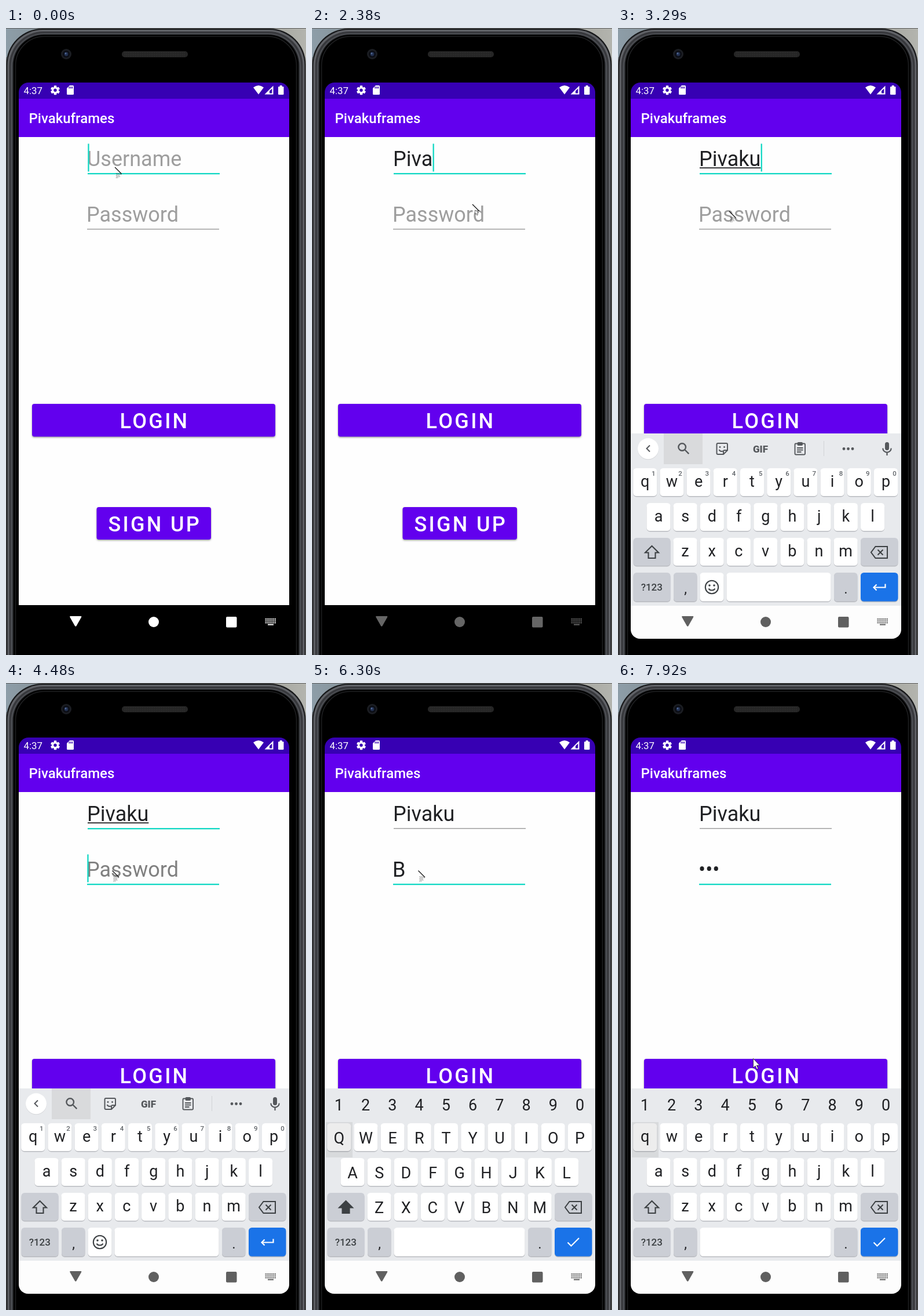
Recreate the animation shown at these times as an HTML page with a canvas. Size 518 by 1081 pixels, loop 8000 ms.

```html
<!DOCTYPE html>
<html lang="en">
<head>
<meta charset="utf-8">
<title>Login screen</title>
<style>
html, body { margin: 0; width: 100%; height: 100%; overflow: hidden; background: #000; }
canvas { display: block; width: 518px; height: 1081px; }
</style>
</head>
<body>
<canvas id="stage"></canvas>
<script>
const W = 518, H = 1081, LOOP = 8000;
const canvas = document.getElementById('stage');
const ctx = canvas.getContext('2d');
const dpr = window.devicePixelRatio || 1;
canvas.width = W * dpr;
canvas.height = H * dpr;

const PURPLE = '#6200ee', TEAL = '#12d8c4', INK = '#202124', KEY_INK = '#3c4043';
const USER = 'Pivaku', TITLE = 'Pivakuframes';

// Timelines: [start ms, value], each held until the next entry.
const tracks = {
  typed: [[0, 0], [730, 1], [880, 2], [1970, 3], [2120, 4], [3040, 6]],
  userCaret: [[0, 1], [120, 0], [610, 1], [1380, 0], [1700, 1], [2520, 0], [2760, 1], [4190, 0], [4620, 1], [4760, 0]],
  pass: [[0, ''], [6300, 'B'], [6450, '•B'], [6980, '••'], [7680, '•••']],
  passCaret: [[0, 0], [4480, 1], [5500, 0], [6450, 1], [6980, 0], [7680, 1], [7920, 0]],
  mouse: [[0, [188, 240, 1]], [730, [221, 239, 0]], [1330, [271, 300, 0]], [1450, [188, 325, 1]],
    [2380, [277, 304, 0]], [2640, [192, 316, 1]], [4190, [183.5, 323.5, 1]], [6980, [368, 323, 0]],
    [7130, [408, 507, 0]], [7280, [330, 562, 2]], [7400, [268, 614, 2]], [7530, [239, 641, 2]], [7680, [233, 647, 2]]],
  nav: [[0, '#ffffff'], [880, '#b4b4b4'], [1030, '#666666'], [2520, '#606060']],
  board: [[0, ''], [2520, 'text'], [4760, 'short'], [5500, 'pass']],
  caps: [[0, 0], [5650, 1], [7130, 0]]
};

function at(name, t) {
  let v;
  for (const [start, value] of tracks[name]) if (t >= start) v = value;
  return v;
}

function rect(x, y, w, h, color) {
  ctx.fillStyle = color;
  ctx.fillRect(x, y, w, h);
}

function round(x, y, w, h, r, color) {
  ctx.fillStyle = color;
  ctx.beginPath();
  ctx.roundRect(x, y, w, h, r);
  ctx.fill();
}

function disc(x, y, r, color) {
  ctx.fillStyle = color;
  ctx.beginPath();
  ctx.arc(x, y, r, 0, 7);
  ctx.fill();
}

function path(d, fill, stroke, width = 2) {
  const p = new Path2D(d);
  if (fill) { ctx.fillStyle = fill; ctx.fill(p); }
  if (stroke) { ctx.strokeStyle = stroke; ctx.lineWidth = width; ctx.stroke(p); }
}

function text(s, x, y, size, color, weight = 400, align = 'left', spacing = 0) {
  ctx.font = `${weight} ${size}px Roboto, sans-serif`;
  ctx.textAlign = align;
  ctx.letterSpacing = spacing + 'px';
  ctx.fillStyle = color;
  ctx.fillText(s, x, y);
}

function shell() {
  const sky = ctx.createLinearGradient(0, 0, W, 0);
  sky.addColorStop(0, '#8d9da8');
  sky.addColorStop(0.5, '#77766f');
  sky.addColorStop(1, '#b3b4ae');
  rect(0, 0, W, H, sky);
  rect(0, 50, 1, H, '#77787b');
  const rings = [[1, 1, 62, '#18191b'], [3, 3, 61, '#606267'], [6, 6, 59, '#37383c'], [9, 9, 57, '#4c4e53'],
    [12, 11, 54, '#17181a'], [14, 12, 52, '#000']];
  for (const [x, y, r, color] of rings) round(x - 0.5, y, W - 2 * x + 1, H + 100, r, color);
  round(16.5, 14.5, 485, H + 100, 50, '#000');
  ctx.strokeStyle = '#1f2022';
  ctx.lineWidth = 1.5;
  ctx.stroke();
  rect(0, 0, W, 1, '#5f6061');
  disc(104, 45, 9, '#1b1d22');
  disc(104, 45, 6, '#0b0d14');
  disc(104, 45, 3.4, '#22304f');
  disc(103, 44, 1.4, '#526995');
  round(200, 40, 114, 10.5, 5, '#252525');
  for (let x = 205; x < 310; x += 3) for (let y = 42; y < 49; y += 3) rect(x, y, 1, 1, '#3b3b3b');
}

function gear(x, y) {
  ctx.save();
  ctx.translate(x, y);
  for (let i = 0; i < 6; i++) {
    ctx.rotate(Math.PI / 3);
    round(-2.3, -8, 4.6, 6, 1, '#fff');
  }
  ctx.restore();
  disc(x, y, 5.8, '#fff');
  disc(x, y, 2.7, '#3700b3');
}

function bars() {
  round(22, 94, 467, 40, [17, 17, 0, 0], '#3700b3');
  rect(22, 122, 467, 66, PURPLE);
  text('4:37', 30.5, 113.5, 16.8, '#fff');
  gear(85, 107.3);
  path('M110 99H115.5Q117 99 117 100.5V113.5Q117 115 115.5 115H106.5Q105 115 105 113.5V104Z', '#fff');
  for (let i = 0; i < 3; i++) rect(108.5 + i * 2.6, 101, 1.4, 3.4, '#3700b3');
  path('M427 102.5Q436 95.5 445 102.5L436 114.5Z', '#fff');
  path('M461.5 99.5V114.5H446.5Z', '#fff');
  path('M459.3 104.5V112.5H455V108.6Z', '#3700b3');
  round(470, 101, 9.5, 14, 1.3, '#fff');
  rect(472.7, 99, 4, 3, '#fff');
  text(TITLE, 39.5, 164, 24, '#fff', 500);
}

function button(label, x, y, w, h, tx) {
  ctx.save();
  ctx.shadowColor = 'rgba(0,0,0,.38)';
  ctx.shadowBlur = 3 * dpr;
  ctx.shadowOffsetY = 1.5 * dpr;
  round(x, y, w, h, 4, PURPLE);
  ctx.restore();
  text(label, tx, y + 42, 36, '#fff', 500, 'left', 3.3);
}

function field(value, hint, hintColor, x, base, active, caret) {
  text(value || hint, x, base, 36, value ? INK : hintColor);
  const end = x + (value ? ctx.measureText(value).width : 1);
  if (active) rect(x + 1, base + 12, 228, 2.3, TEAL);
  else rect(x + 1, base + 12.1, 228, 1.4, '#999');
  if (caret) rect(end + 0.3, base - 38.5, 2.3, 48, TEAL);
  return end;
}

function key(x, y, w, color = '#fff', h = 48) {
  round(x, y + 1.4, w, h, 5.5, '#b9bbc0');
  round(x, y, w, h, 5.5, color);
}

function toolbar(full) {
  rect(79, 699, 67, 53, full === 'plain' ? '#e8eaed' : '#d9dadc');
  disc(52, 726.3, 18, '#d3d5d8');
  disc(52, 725.3, 18, '#fff');
  const c = '#55585c';
  path(full ? 'M55 719.5L49.5 725L55 730.5' : 'M49.5 719.5L55 725L49.5 730.5', null, c, 2);
  if (full) {
    path('M117 722.5A6.3 6.3 0 1 1 104.4 722.5A6.3 6.3 0 1 1 117 722.5M115.2 727L122.3 734.2', null, c, 2.4);
    path('M172.5 716H187Q189 716 189 718V728L182 735H172.5Q170.5 735 170.5 733V718Q170.5 716 172.5 716ZM189 728H184Q182 728 182 730V735M174.5 727Q176.5 731 181 729.5', null, c, 2);
    disc(176, 722.5, 1.4, c);
    disc(183.5, 722.5, 1.4, c);
    text('GIF', 246, 731.5, 17, c, 900, 'center');
    path('M307 716.5H321.5Q323 716.5 323 718V734Q323 735.5 321.5 735.5H307Q305.5 735.5 305.5 734V718Q305.5 716.5 307 716.5ZM309 724H319.5M309 727.5H319.5M309 731H316.5', null, c, 1.9);
    round(309.5, 714, 9.5, 6, 2, c);
    rect(355, 712, 1, 26, '#d0d2d5');
    for (let i = 0; i < 3; i++) disc(390 + i * 7.5, 725.5, 2.4, c);
  }
  round(461, 714, 7, 14, 3.5, c);
  path('M457.3 724.5A7.2 7.2 0 0 0 471.7 724.5M464.5 732V737', null, c, 2.2);
}

function letters(row, x0, y, caps) {
  [...row].forEach((ch, i) => {
    const x = x0 + i * 46.2;
    key(x - 20.5, y, 41);
    text(caps ? ch.toUpperCase() : ch, x, y + (caps ? 34.5 : 32), 27, INK, 400, 'center');
  });
}

function keyboard(board, caps, t) {
  const secret = board === 'pass', grey = '#cbced5';
  rect(22, 699, 467, 297, '#e8eaed');
  letters('qwertyuiop', 46.7, 759, caps);
  letters('asdfghjkl', 70, 819, caps);
  letters('zxcvbnm', 116, 879, caps);
  for (let i = 0; i < 10; i++) {
    const d = String((i + 1) % 10), x = 46.3 + i * 46.25;
    if (secret) text(d, x, 736.5, 27, INK, 400, 'center');
    else text(d, x + 15, 772, 11.5, '#5f6368', 500, 'center');
  }
  if (secret) rect(24, 757, 46, 61, 'rgba(0,0,0,.07)');
  else toolbar(board === 'short' ? '' : t < 2640 ? 'plain' : 'full');

  key(26.5, 879, 64, grey);
  path('M58.5 893L70 904.5H64.5V914H52.5V904.5H47Z', caps ? KEY_INK : null, KEY_INK, 2.1);
  key(419, 879, 64.5, grey);
  path('M444.5 894H465V914H444.5L437 904ZM448.5 899.5L457.5 908.5M457.5 899.5L448.5 908.5', null, KEY_INK, 2);

  key(26.5, 939, 64, grey, 49.5);
  text('?123', 58.3, 970, 17, KEY_INK, 500, 'center');
  key(96, 939, 40.5, grey, 49.5);
  text(',', 116.5, 975, 24, INK, 400, 'center');
  key(373, 939, 40.5, grey, 49.5);
  text('.', 393.5, 975, 24, INK, 400, 'center');
  if (secret) key(141.5, 939, 226, '#fff', 49.5);
  else {
    key(141.5, 939, 41, '#fff', 49.5);
    key(187.5, 939, 180, '#fff', 49.5);
    ctx.beginPath();
    ctx.arc(162, 964, 11.2, 0, 7);
    ctx.strokeStyle = KEY_INK;
    ctx.lineWidth = 2.1;
    ctx.stroke();
    disc(158, 961, 1.8, KEY_INK);
    disc(166, 961, 1.8, KEY_INK);
    path('M156.5 966.5A6 5 0 0 0 167.5 966.5', null, KEY_INK, 2);
  }
  key(419, 939, 64.5, '#1a73e8', 49.5);
  path(secret ? 'M441.5 964.5L447.5 970.5L461 957' : 'M461.5 958.5V964.5H441.5M446.5 959.5L441.5 964.5L446.5 969.5', null, '#fff', 2.2);
}

function navigation(color, light) {
  if (light) {
    rect(22, 996, 467, 20, '#fdfdfd');
    round(22, 1000, 467, 53, [0, 0, 16, 16], '#fdfdfd');
  } else rect(22, 995, 467, 58, '#000');
  path('M111 1014H129.5Q131 1014 130 1016L121.5 1031Q120.3 1032.5 119 1031L110.5 1016Q109.5 1014 111 1014Z', color);
  disc(255, 1024, 9, color);
  round(380, 1015, 18.5, 18.5, 2, color);
  for (let r = 0; r < 3; r++) for (let i = 0; i < 7; i++) rect(447.5 + i * 2.75, 1018 + r * 3.2, 1.9, 2, color);
  rect(452, 1027.6, 10, 2, color);
}

// Pointer kinds: 0 line with small arrow, 1 line with dots, 2 plain white arrow.
function pointer([x, y, kind]) {
  ctx.save();
  ctx.translate(x, y);
  if (kind === 2) {
    path('M.5 .5V16.5L4 13L6.7 19L9 18L6.4 12.2H11.5Z', '#fff', '#222', 0.8);
  } else {
    path('M0 0L11.5 11.5', null, '#111', 1.2);
    if (kind === 1) {
      for (let r = 0; r < 5; r++) {
        for (let i = 0; i < 4 - Math.floor(r / 2); i++) rect(2 + i * 2.3 + (r % 2), 10 + r * 1.9, 1, 1, '#333');
      }
    } else {
      path('M4.5 10V17L6.3 15.5L8 19L9.5 18L8 14.7H11L8 12Z', '#fff', '#444', 0.8);
    }
  }
  ctx.restore();
}

function draw(t) {
  ctx.setTransform(dpr, 0, 0, dpr, 0, 0);
  shell();
  rect(22, 188, 467, 807, '#fefefe');
  bars();

  const user = USER.slice(0, at('typed', t));
  const end = field(user, 'Username', '#9e9e9e', 140, 238, t < 4760, at('userCaret', t));
  if (t >= 3290 && t < 4760) rect(141, 240.3, end - 141, 1.8, INK);
  const focused = t >= 4480;
  field(at('pass', t), 'Password', focused ? '#808080' : '#9e9e9e', 139, 334, focused, at('passCaret', t));

  button('LOGIN', 45, 648, 420, 56.5, 196.5);
  button('SIGN UP', 156.5, 826, 197.5, 56, 176.5);
  const board = at('board', t);
  if (board) keyboard(board, at('caps', t), t);
  navigation(at('nav', t), board);
  pointer(at('mouse', t));
}

let begin;
function tick(now) {
  begin ??= now;
  draw((now - begin) % LOOP);
  requestAnimationFrame(tick);
}
draw(0);
requestAnimationFrame(tick);
</script>
</body>
</html>
```
